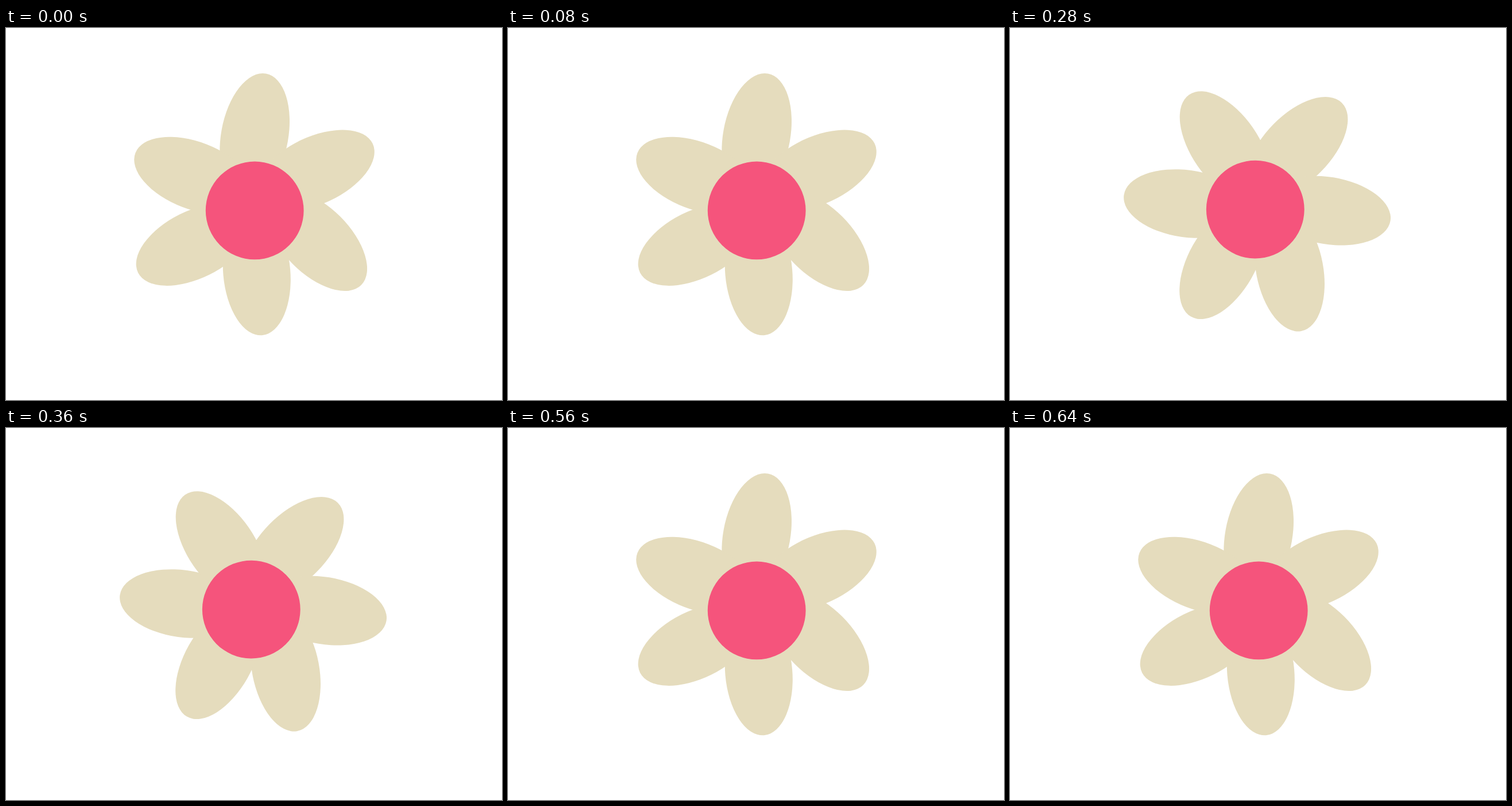
An HTML page that plays this animation: 864 px wide and 648 px high, repeating every 0.7 s.

```html
<!DOCTYPE html>
<html lang="en">
<head>
<meta charset="utf-8">
<title>Turning flower</title>
<style>
  html, body { margin: 0; width: 100%; height: 100%; overflow: hidden; background: #fff; }
  svg { display: block; width: 100vw; height: 100vh; }
</style>
</head>
<body>
<svg viewBox="0 0 864 648">
  <g id="flower">
    <g id="petals" fill="#e5dcbd" transform="translate(0 3.3)"></g>
    <circle cy="10.5" r="85.4" fill="#f5547c"/>
  </g>
</svg>
<script>
  const STEP = 140;                    // ms per pose
  const STEPS = 5;                     // the first pose also closes the loop
  const POSES = [0, 17.6, 34.3, 58.3]; // turn in degrees
  const PIVOT = '433.2 307.4';

  // Petals fan out evenly from the top; reach and lean give the hand-drawn look.
  const SPREAD = 59.4;
  const REACH = [123, 123, 123, 115, 124, 118];
  const LEAN = [10.3, 5.6, 16.2, -3, 5.9, -6];

  const flower = document.getElementById('flower');
  const petals = document.getElementById('petals');

  REACH.forEach((reach, i) => {
    const petal = document.createElementNS('http://www.w3.org/2000/svg', 'ellipse');
    petal.setAttribute('rx', 110);
    petal.setAttribute('ry', 58.5);
    petal.setAttribute('transform',
      `rotate(${SPREAD * i - 90}) translate(${reach}) rotate(${LEAN[i]})`);
    petals.append(petal);
  });

  function draw(ms) {
    const step = Math.floor(ms / STEP) % STEPS;
    const turn = POSES[step % POSES.length];
    flower.setAttribute('transform', `translate(${PIVOT}) rotate(${turn})`);
  }

  const start = performance.now();
  function tick() {
    draw(performance.now() - start);
    requestAnimationFrame(tick);
  }
  tick();
</script>
</body>
</html>
```
